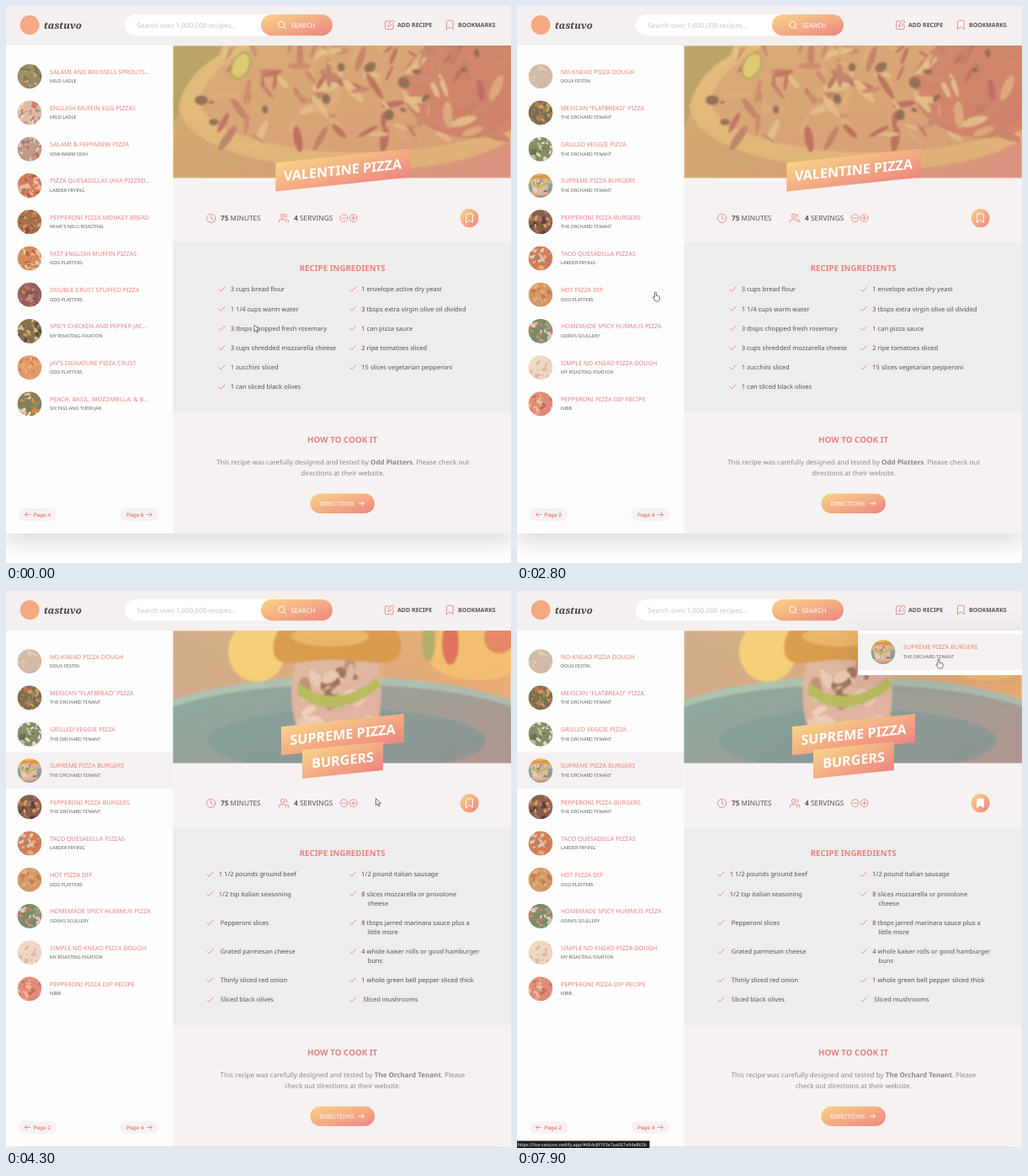
Write an HTML page that moves like this. It is 600x662 px and loops after 8 s.

```html
<!DOCTYPE html>
<html lang="en">
<head>
<meta charset="utf-8">
<title>Recipe search</title>
<style>
  html, body { margin: 0; width: 600px; height: 662px; overflow: hidden; background: #fff; }
  svg { display: block; font-family: "Noto Sans", "Open Sans", sans-serif; text-rendering: geometricPrecision; }
  text { white-space: pre; }
  .line { fill: none; stroke-linecap: round; stroke-linejoin: round; }
  .pager { font: bold 6.4px "Liberation Sans", Arial, sans-serif; }
</style>
</head>
<body>
<svg id="stage" width="600" height="662" viewBox="0 0 600 662"></svg>
<script>
const PINK = '#e9827e', DARK = '#5a504e', SOFT = '#8f8583', PANEL = '#f6f2f1', ACTIVE = '#f5f1f0';
const GROWTH = 33; // extra page height of the second recipe

const text = (x, y, str, size, fill, attrs = '') =>
  `<text x="${x}" y="${y}" font-size="${size}" fill="${fill}" ${attrs}>${str}</text>`;
const rect = (x, y, w, h, fill, attrs = '') =>
  `<rect x="${x}" y="${y}" width="${w}" height="${h}" fill="${fill}" ${attrs}/>`;
const oval = (x, y, rx, ry, fill, attrs = '') =>
  `<ellipse cx="${x}" cy="${y}" rx="${rx}" ry="${ry}" fill="${fill}" ${attrs}/>`;
const shape = (d, fill) => `<path d="${d}" fill="${fill}"/>`;
const line = (d, color = PINK, width = 0.9, attrs = '') =>
  `<path class="line" d="${d}" stroke="${color}" stroke-width="${width}" ${attrs}/>`;
const arrow = (x, y, dir, color) =>
  line(`M${x} ${y}h${6 * dir}m${-2.5 * dir} -2.5l${2.5 * dir} 2.5 ${-2.5 * dir} 2.5`, color);
const bookmark = (x, y) => `M${x} ${y + 1}q0 -1 1 -1h5.6q1 0 1 1v9.4l-3.8 -2.8 -3.8 2.8z`;
const fade = (id, from, to, attrs = '') =>
  `<linearGradient id="${id}" ${attrs}><stop stop-color="${from}"/><stop offset="1" stop-color="${to}"/></linearGradient>`;
const centred = 'text-anchor="middle"', bold = 'font-weight="700"';

const random = seed => {
  let s = seed * 99991 + 12345;
  return () => (s = s * 16807 % 2147483647) / 2147483647;
};

// Seeded blobs spread over a box
function scatter(seed, count, colors, x, y, w, h, size, flat = 0.35) {
  const rnd = random(seed);
  return Array.from({ length: count }, (_, i) => {
    const cx = x + w * rnd(), cy = y + h * rnd(), r = size * (0.5 + rnd());
    return oval(cx, cy, r, r * flat * (1 + rnd()), colors[i % colors.length],
      `transform="rotate(${rnd() * 180} ${cx} ${cy})"`);
  }).join('');
}

// ---- photos as simple shapes ----
const pizzaPhoto =
  rect(198, 47, 402, 158, 'url(#table)') +
  shape('M198 47h60L198 140z', '#ab9a60') +
  shape('M205 120C215 70 270 40 330 40H610V150C560 195 440 200 360 192 300 186 210 165 205 120z', '#dcb876') +
  shape('M230 110C245 70 290 40 340 40H600V135C560 170 440 178 370 172 310 165 232 150 230 110z', '#d2a273') +
  oval(555, 95, 85, 62, '#c2685e', 'opacity=".65"') +
  scatter(5, 110, ['#b4645a', '#dfc088', '#c5806a', '#d8ab78', '#b87766'], 255, 48, 335, 112, 12, 0.18) +
  scatter(11, 14, ['#7d6150'], 240, 55, 330, 95, 5, 0.5) +
  oval(279, 71, 10, 16, '#d9ca6c', 'stroke="#99a05a" stroke-width="2" transform="rotate(25 279 71)"') +
  oval(232, 112, 8, 6, '#7d6150') + oval(247, 138, 6, 4, '#7d6150');

const burgerPhoto =
  rect(198, 47, 402, 158, 'url(#wall)') +
  oval(298, 72, 34, 36, '#f5d274') +
  oval(560, 72, 62, 34, '#f2c46c') + oval(502, 60, 8, 24, '#a3ae68') +
  oval(528, 62, 10, 26, '#dc6454') + oval(586, 56, 18, 18, '#e2805c') +
  oval(400, 170, 250, 68, '#9cc4ba') + oval(400, 172, 242, 61, 'url(#plate)') +
  oval(405, 178, 165, 38, '#5f979b', 'opacity=".6"') +
  oval(396, 176, 56, 18, '#d9a468') +
  shape('M344 84Q395 72 442 86Q452 130 436 178Q392 192 350 176Q332 130 344 84z', '#dab6a6') +
  scatter(3, 40, ['#b58a78', '#ecd8ca', '#8f6454', '#dcbaa8', '#e8cdbf'], 348, 88, 86, 80, 9) +
  shape('M346 108Q370 128 396 124T440 102l6 11Q420 134 396 138T346 124z', '#aabf56') +
  shape('M318 74C314 40 340 26 395 26S474 44 469 72C462 92 440 84 395 82S326 96 318 74z', '#d4943f') +
  oval(385, 54, 46, 12, '#e8b363');

function thumb(palette, seed) {
  const colors = palette.split(' ').map(c => '#' + c);
  const photo = palette === 'burger'
    ? '<use href="#burger" transform="scale(.19) translate(-398 -127)"/>'
    : oval(0, 0, 15, 15, colors[0]) + scatter(seed, 44, colors, -14, -14, 28, 28, 2.6);
  return `<g transform="translate(28 21.6)" clip-path="url(#disc)">${photo}${oval(0, 0, 15, 15, 'url(#warm)', 'opacity=".12"')}</g>`;
}

// ---- result lists: title, publisher, photo colours ----
const lists = [
  [
    ['SALAMI AND BRUSSELS SPROUTS...', 'MILD LADLE', '886 a85 674 ca7'],
    ['ENGLISH-MUFFIN EGG PIZZAS', 'MILD LADLE', 'dba edb c76 998'],
    ['SALAMI &amp; PEPPADEW PIZZA', 'VDW WARM DISH', 'b98 b65 dcb 977'],
    ['PIZZA QUESADILLAS (AKA PIZZAD...', 'LARDER FRYING', 'c75 dba a54 eb9'],
    ['PEPPERONI PIZZA MONKEY BREAD', "WHAT'S NELU ROASTING", '964 b74 ca6 743'],
    ['FAST ENGLISH MUFFIN PIZZAS', 'ODD PLATTERS', 'c85 db7 b54 eca'],
    ['DOUBLE CRUST STUFFED PIZZA', 'ODD PLATTERS', '855 744 b87 a66'],
    ['SPICY CHICKEN AND PEPPER JAC...', 'MY ROASTING FIXATION', '764 cb8 b86 443'],
    ["JAY'S SIGNATURE PIZZA CRUST", 'ODD PLATTERS', 'd96 ea7 c75'],
    ['PEACH, BASIL, MOZZARELLA, &amp; B...', 'SIX FIGS AND THEIR JAR', '775 edb c84 885']
  ], [
    ['NO-KNEAD PIZZA DOUGH', 'DOUX FESTIN', 'cba dcb cba'],
    ['MEXICAN “FLATBREAD” PIZZA', 'THE ORCHARD TENANT', '664 c95 886 b65'],
    ['GRILLED VEGGIE PIZZA', 'THE ORCHARD TENANT', '786 bb9 564 edc'],
    ['SUPREME PIZZA BURGERS', 'THE ORCHARD TENANT', 'burger'],
    ['PEPPERONI PIZZA BURGERS', 'THE ORCHARD TENANT', '754 c95 433 a66'],
    ['TACO QUESADILLA PIZZAS', 'LARDER FRYING', 'c75 ea6 dcb a76'],
    ['HOT PIZZA DIP', 'ODD PLATTERS', 'c96 b74 ea7'],
    ['HOMEMADE SPICY HUMMUS PIZZA', "ODRA'S SCULLERY", '686 c65 997 dcb'],
    ['SIMPLE NO KNEAD PIZZA DOUGH', 'MY ROASTING FIXATION', 'edc dba edc'],
    ['PEPPERONI PIZZA DIP RECIPE', 'NIBB', 'd87 eb9 b65']
  ]
];
const ROW_TOP = 62, ROW_PITCH = 43.25;

const row = ([title, publisher, palette], x, y, seed) =>
  `<g transform="translate(${x} ${y})"><g class="row">${rect(-2, 0, 200.5, 43.2, ACTIVE, 'opacity="0"')}
  ${thumb(palette, seed)}${text(52, 18.6, title, 7.24, PINK)}${text(52, 29.1, publisher, 5.5, '#655a56')}</g></g>`;

const pager = (prev, next) => `<g class="pagers">
  ${rect(14.5, 597, 46, 15, PANEL, 'rx="7.5" class="prev"')}${arrow(28.5, 604.5, -1)}
  <text class="pager" x="32.5" y="606.8" fill="${PINK}">Page ${prev}</text>
  ${rect(135.5, 597, 46, 15, PANEL, 'rx="7.5"')}${arrow(167.5, 604.5, 1)}
  <text class="pager" x="143" y="606.8" fill="${PINK}">Page ${next}</text></g>`;

const listView = (items, i) => `<g class="list">
  ${items.map((item, k) => row(item, 0, ROW_TOP + ROW_PITCH * k, i * 10 + k + 1)).join('')}
  ${i ? pager(2, 4) : pager(4, 6)}</g>`;

// ---- recipes ----
const recipes = [
  {
    photo: 'pizza', label: [['VALENTINE PIZZA', 195, 159.5]], checkX: 252.5, panel: 202, shift: 0,
    left: ['3 cups bread flour', '1 1/4 cups warm water', '3 tbsps chopped fresh rosemary',
      '3 cups shredded mozzarella cheese', '1 zucchini sliced', '1 can sliced black olives'],
    right: ['1 envelope active dry yeast', '3 tbsps extra virgin olive oil divided', '1 can pizza sauce',
      '2 ripe tomatoes sliced', '15 slices vegetarian pepperoni'],
    credit: ['Odd Platters', '. Please check out', 'directions at their website.']
  }, {
    photo: 'burger', label: [['SUPREME PIZZA', 170.6, 146], ['BURGERS', 201, 96]], checkX: 238.5, panel: 235, shift: GROWTH,
    left: ['1 1/2 pounds ground beef', '1/2 tsp italian seasoning', ' Pepperoni slices',
      ' Grated parmesan cheese', ' Thinly sliced red onion', ' Sliced black olives'],
    right: ['1/2 pound italian sausage', '8 slices mozzarella or provolone|cheese', '8 tbsps jarred marinara sauce plus a|little more',
      '4 whole kaiser rolls or good hamburger|buns', '1 whole green bell pepper sliced thick', ' Sliced mushrooms'],
    credit: ['The Orchard Tenant', '. Please', 'check out directions at their website.']
  }
];

function ingredient(x, y, entry) {
  const [first, second] = entry.split('|');
  return line(`M${x + 0.3} ${y + 0.3}l2.4 2.4 4.8 -5.2`) + text(x + 14.3, y + 2.8, first, 7.55, DARK) +
    (second ? text(x + 21.5, y + 13.8, second, 7.55, DARK) : '');
}

function ingredients({ left, right, checkX }) {
  let y = 336.5, out = '';
  left.forEach((entry, i) => {
    const other = right[i] || '';
    out += ingredient(checkX, y, entry) + (other && ingredient(408, y, other));
    y += 23.2 + (other.includes('|') ? 11 : 0);
  });
  return out;
}

const label = ([str, y, w]) => `<g transform="translate(400 ${y}) skewY(-6)">
  ${rect(-w / 2, -17, w, 34, 'url(#warm)')}${text(0, 5.7, str, 16.1, '#fff', `${centred} ${bold}`)}</g>`;

const recipeView = r => `<g class="recipe">
  <g clip-path="url(#hero)"><use href="#${r.photo}"/>${rect(198.5, 47, 402, 158, 'url(#warm)', 'opacity=".2"')}</g>
  ${r.label.map(label).join('')}
  ${rect(198.5, 281, 402, r.panel, '#eeedec')}
  ${text(399.7, 315.2, 'RECIPE INGREDIENTS', 9.75, PINK, `${centred} ${bold}`)}
  ${ingredients(r)}
  <g transform="translate(0 ${r.shift})">
    ${text(399.7, 518.7, 'HOW TO COOK IT', 9.8, PINK, `${centred} ${bold}`)}
    ${text(400, 544.8, `This recipe was carefully designed and tested by <tspan ${bold}>${r.credit[0]}</tspan>${r.credit[1]}`, 8.03, SOFT, centred)}
    ${text(400, 558, r.credit[2], 8.03, SOFT, centred)}
    ${rect(361.5, 579.5, 76.5, 23.5, 'url(#warm)', 'rx="11.75"')}
    ${text(372.5, 593.6, 'DIRECTIONS', 7, '#fff', 'font-weight="500"')}${arrow(419.5, 591.2, 1, '#fff')}
  </g></g>`;

const header = rect(0, 0, 600, 47, '#f5f0f0') +
  oval(28.2, 22.6, 11.5, 11.5, '#f3a982') +
  text(45, 27, 'tastuvo', 11.5, '#443b3a', 'font-weight="700" font-style="italic" font-family="Noto Serif, serif"') +
  rect(141, 10, 247, 25.3, '#fff', 'rx="12.6"') +
  text(155.5, 25.5, 'Search over 1,000,000 recipes...', 8.05, '#cbc1be') +
  rect(303, 10, 85, 25.3, 'url(#warm)', 'rx="12.6"') +
  '<circle class="line" cx="327.4" cy="22" r="3.7" stroke="#fff"/>' + line('M330.2 24.8l2.5 2.5', '#fff', 1) +
  text(338.5, 25.5, 'SEARCH', 7.8, '#fff', 'font-weight="500"') +
  line('M456 18h-4.5q-1 0 -1 1v7.6q0 1 1 1h7.6q1 0 1 -1V22.5M459.4 16.9l1.9 1.9 -5 5 -2.4 .5 .5 -2.4z') +
  text(465, 25.1, 'ADD RECIPE', 7, DARK, bold) +
  line(bookmark(523.6, 17.2)) + text(537, 25.1, 'BOOKMARKS', 6.95, DARK, bold);

const details =
  line('M248.8 252.3a5.2 5.2 0 1 1 -10.4 0a5.2 5.2 0 1 1 10.4 0M243.6 249.1v3.3l2 1.2') +
  text(255, 255, `<tspan ${bold}>75</tspan> MINUTES`, 8.2, DARK) +
  line('M330.8 249.4a2.2 2.2 0 1 1 -4.4 0a2.2 2.2 0 1 1 4.4 0M324.4 257v-1q0 -2.4 2.4 -2.4h3.6q2.4 0 2.4 2.4v1M332.2 247.3a2.2 2.2 0 0 1 0 4.2M335.8 257v-1q0 -1.9 -1.8 -2.3') +
  text(342, 255, `<tspan ${bold}>4</tspan> SERVINGS`, 8.4, DARK) +
  [401.5, 412.7].map(x => line(`M${x + 4.4} 252a4.4 4.4 0 1 1 -8.8 0a4.4 4.4 0 1 1 8.8 0M${x - 2} 252h4`)).join('') +
  line('M412.7 250v4') +
  `<g id="save">${oval(0, 0, 11, 11, 'url(#warm)')}${line(bookmark(-3.8, -5.2), '#fff', 1, 'id="saveIcon"')}</g>`;

const stage = document.getElementById('stage');
stage.innerHTML = `<defs>
  ${fade('warm', '#f8d488', '#ee8580', 'x2="1" y2="1"')}
  ${fade('table', '#c9a56c', '#d6957f')}
  ${fade('wall', '#c7a58c', '#e8b070')}
  ${fade('plate', '#6aa5a6', '#a09a94', 'x2="1" y2=".5"')}
  <clipPath id="disc"><circle r="14.3"/></clipPath>
  <clipPath id="hero"><rect x="198.5" y="47" width="402" height="157.5"/></clipPath>
  <filter id="soft"><feGaussianBlur stdDeviation="1"/></filter>
  <filter id="shade" x="-30%" y="-100%" width="160%" height="300%"><feGaussianBlur stdDeviation="13"/></filter>
  <g id="pizza" filter="url(#soft)">${pizzaPhoto}</g><g id="burger" filter="url(#soft)">${burgerPhoto}</g>
</defs>
<g class="pagers">${rect(-2, 500, 604, 138.7, '#615551', 'opacity=".2" filter="url(#shade)"')}</g>
${rect(0, 0, 600, 627, PANEL, 'id="sheet"')}${rect(0, 47, 198.5, 580, '#fefdfd', 'id="sidebar"')}
${lists.map(listView).join('')}${recipes.map(recipeView).join('')}${details}${header}
<g id="menu">${rect(396, 47, 220, 66, '#615551', 'opacity=".12" filter="url(#shade)"')}
  ${rect(405, 47, 195, 53, '#fff')}${row(lists[1][3], 407, 51.9, 1)}</g>
<g id="status">${rect(0, 653.5, 157.5, 9, '#1d1c1f')}
  ${text(0.5, 660.3, 'https://live-tastuvo.netlify.app/#664c8f193e7aa067e94e863b', 5.4, '#eee')}</g>
<g id="cursor" fill="#fff" stroke="#3a3838" stroke-width=".7" stroke-linejoin="round">
  <path d="M0 0v8.2l2 -1.8 1.3 2.9 1.2 -.5 -1.3 -2.8h2.6z"/>
  <path d="M-1 1a1 1 0 0 1 2 0v3.2l3.2 .7q1.2 .3 1 1.6l-.6 3.4q-.3 1.1 -1.3 1.1h-2.6q-.8 0 -1.3 -.8l-2.3 -3.4c-.5 -.9 .5 -1.5 1.2 -.9l.7 .7z"/>
</g>`;

// ---- motion ----
const $ = id => document.getElementById(id);
const all = sel => [...stage.querySelectorAll(sel)];
const listGroups = all('.list'), recipeGroups = all('.recipe'), pagers = all('.pagers'), prevButtons = all('.prev');
const rows = listGroups.map(g => [...g.querySelectorAll('.row')]);
const menuRow = $('menu').querySelector('.row');
const [arrowShape, handShape] = $('cursor').children;

// Pointer path: time, x, y, hand pointer
const path = [
  [0, 295, 379, 0], [900, 60, 598, 1], [1200, 34.5, 605.5, 1], [2700, 34.5, 605.5, 1], [2800, 164.5, 340, 1],
  [3300, 141.5, 206, 1], [3700, 141.5, 206, 1], [3900, 205, 216, 0], [4300, 439.5, 246.5, 0],
  [4500, 531, 252, 0], [4600, 541, 252, 1], [4800, 546, 252.5, 1], [5200, 546, 252.5, 1], [5300, 536, 258, 0],
  [5700, 496, 291, 0], [6000, 513, 241, 0], [6100, 514, 223, 0], [6400, 548, 20, 1],
  [7100, 548, 20, 1], [7600, 510, 78, 1], [7900, 501, 81, 1], [8000, 501, 81, 1]
];

function pointerAt(t) {
  const i = Math.max(0, path.findIndex(k => k[0] > t) - 1);
  const [t0, x0, y0, hand] = path[i], [t1, x1, y1] = path[i + 1];
  const f = (t - t0) / (t1 - t0);
  return { x: x0 + (x1 - x0) * f, y: y0 + (y1 - y0) * f, hand };
}

const show = (el, on) => el.setAttribute('display', on ? 'inline' : 'none');
function styleRow(el, hover, active) {
  el.setAttribute('transform', `translate(0 ${hover ? -1 : 0})`);
  el.firstElementChild.setAttribute('opacity', hover || active ? 1 : 0);
}

function render() {
  const t = Math.floor(performance.now() % 8000 / 100) * 100;
  const list = t >= 2000 ? 1 : 0, recipe = t >= 3500 ? 1 : 0, grow = recipe * GROWTH;
  const pointer = pointerAt(t), lagged = pointerAt(Math.max(0, t - 100));

  listGroups.forEach((g, i) => show(g, i === list));
  recipeGroups.forEach((g, i) => show(g, i === recipe));
  pagers.forEach(g => g.setAttribute('transform', `translate(0 ${grow})`));
  $('sheet').setAttribute('height', 627 + grow);
  $('sidebar').setAttribute('height', 580 + grow);

  const hoverRow = lagged.x < 198 && pointer.x < 198 ? Math.floor((lagged.y - ROW_TOP) / ROW_PITCH) : -1;
  rows[list].forEach((el, i) => styleRow(el, i === hoverRow, recipe && i === 3));
  const onPager = t >= 1000 && t < 2800;
  prevButtons.forEach(b => b.setAttribute('fill', onPager ? '#ebe7e6' : PANEL));

  const onSave = t >= 4600 && t < 5300;
  $('save').setAttribute('transform', `translate(550.6 252.1) scale(${onSave ? 1.06 : 1})`);
  $('saveIcon').style.fill = t >= 5000 ? '#fff' : 'none';

  $('menu').setAttribute('opacity', Math.min(1, Math.max(0, (t - 6400) / 500)));
  styleRow(menuRow, t > 7100 && lagged.y > 52);
  show($('status'), (t >= 3300 && t < 3900) || t >= 7500);

  $('cursor').setAttribute('transform', `translate(${pointer.x} ${pointer.y})`);
  show(arrowShape, !pointer.hand);
  show(handShape, pointer.hand);
  requestAnimationFrame(render);
}
render();
</script>
</body>
</html>
```
